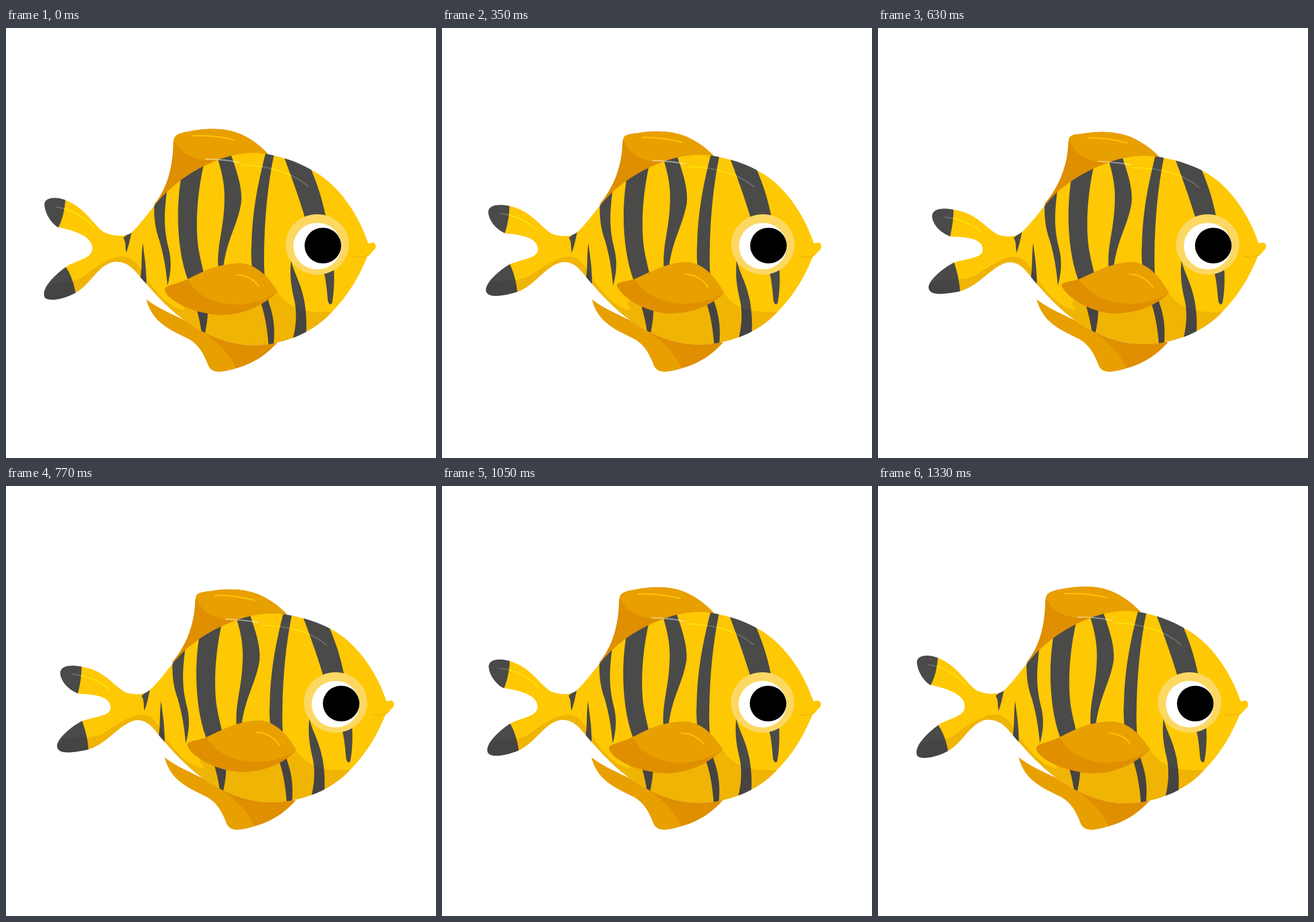
An HTML page that plays this animation: 748x748 px, repeating every 1.4 s.

```html
<!DOCTYPE html>
<html lang="en">
<head>
<meta charset="utf-8">
<title>Swimming fish</title>
<style>
  html, body { margin: 0; width: 100%; height: 100%; overflow: hidden; background: #fff; }
  svg { display: block; width: 100%; height: 100%; }
  .dark { fill: #df8f00; }
  .light { fill: #e89f00; }
  .stripes { fill: #4a4a48; }
  .shade { fill: #f1e6ec; mix-blend-mode: multiply; }
  .line { fill: none; stroke-width: 2.2; stroke-linecap: round; }
  .gold { stroke: #fdc407; }
  .gleam { stroke: #fff; stroke-opacity: .45; }
  .shine { mix-blend-mode: overlay; }
</style>
</head>
<body>
<svg viewBox="0 0 748 748">
  <defs><clipPath id="inside"><use href="#skin"/></clipPath></defs>
  <g id="fish">
    <!-- top fin -->
    <path class="dark" data-peak="560"
      d="M257 308 C282 277 289 240 290 203 C290 189 296 183 320 179 C355 172 386 174 408 184 C430 194 444 206 457 220 L400 250Z"
      data-to="M256 308 C284 275 297 240 299 203 C300 189 304 185 324 184 C355 178 386 181 408 190 C430 200 444 211 457 224 L400 250Z"/>
    <path class="light" data-peak="560"
      d="M291 194 C293 185 302 182 320 179 C355 172 386 174 408 184 C430 194 444 206 457 220 L400 236 L370 228 C332 233 303 222 291 194Z"
      data-to="M300 194 C301 186 308 185 324 184 C355 178 386 181 408 190 C430 200 444 211 457 224 L400 240 L374 233 C338 236 312 223 300 194Z"/>
    <path class="line gold" data-peak="560"
      d="M324 187 C350 186 375 189 397 194" data-to="M334 191 C358 191 380 194 401 200"/>

    <!-- bottom fin -->
    <path class="light" d="M244 472 C270 492 300 502 330 518 L400 535 L472 547 C450 572 425 585 400 592 Q385 597 371 598 C361 598 354 594 351 585 C344 566 334 550 318 541 C290 527 255 515 244 472Z"/>
    <path class="dark" d="M318 512 C355 535 388 560 400 592 C425 585 450 572 472 547 L400 530Z"/>

    <!-- body and tail -->
    <g clip-path="url(#inside)">
      <path id="skin" fill="#fec804" data-peak="630"
        d="M630 374 C614 325 578 270 530 246 C500 229 460 217 428 217 C370 219 310 255 279 286 C255 309 240 335 217 357 C205 364 185 362 170 355 C150 340 133 305 94 296 C78 293 66 297 67 308 C69 325 80 340 90 346 C112 351 150 360 150 383 C150 402 125 402 104 416 C85 430 62 452 67 468 C70 476 95 475 121 461 C147 447 160 412 187 407 C215 404 226 426 243 444 C270 475 295 500 325 518 C365 543 400 552 430 552 C482 552 535 530 567 494 C600 460 615 430 629 397 C636 394 636 389 640 387 C645 382 644 374 638 373 C635 373 633 375 630 374Z"
        data-to="M630 374 C614 325 578 270 530 247 C500 232 460 222 428 222 C370 224 310 258 279 286 C255 309 240 335 217 356 C206 365 186 363 176 359 C152 345 140 322 100 316 C78 312 62 315 62 328 C64 345 80 358 95 363 C117 364 150 364 150 386 C150 400 125 400 100 408 C80 418 55 440 56 452 C58 466 80 464 111 458 C145 448 165 415 193 408 C217 405 227 426 243 444 C270 475 295 500 325 518 C365 542 400 550 430 550 C482 550 535 529 567 494 C600 460 615 430 629 397 C636 394 636 389 640 387 C645 382 644 374 638 373 C635 373 633 375 630 374Z"/>
      <g class="stripes">
        <path data-peak="630" d="M50 280 L104 290 C103 315 98 335 89 350 L50 350Z"
          data-to="M45 300 L99 310 C100 330 97 348 92 368 L45 368Z"/>
        <path data-peak="630" d="M50 412 L101 412 C112 425 119 445 122 466 L50 490Z"
          data-to="M40 404 L99 404 C106 425 110 440 111 465 L40 480Z"/>
        <path d="M204 365 L219 353 C215 370 214 378 209 391 C207 380 209 372 204 365Z"/>
        <path d="M238 374 C241 400 245 420 244 450 L234 434 C237 415 235 395 238 374Z"/>
        <path d="M258 295 L281 275 C275 320 274 345 282 380 C289 405 287 425 281 448 C278 415 274 395 267 370 C258 345 257 325 258 295Z"/>
        <path d="M306 253 L346 230 C334 275 328 340 335 385 C340 415 350 440 351 480 C352 505 348 520 346 532 Q342 534 340 528 C336 500 325 465 316 437 C297 385 295 310 306 253Z"/>
        <path d="M366 220 L389 214 C402 250 412 280 409 305 C402 345 385 365 378 416 L369 416 C367 375 379 350 380 300 C381 270 374 245 366 220Z"/>
        <path d="M453 212 L468 212 C457 262 450 320 449 390 C448 430 452 460 458 480 C467 505 468 530 465 556 L457 556 C455 525 450 495 442 475 C430 440 425 410 427 380 C428 320 438 270 453 212Z"/>
        <path d="M481 218 L527 238 C545 277 555 315 560 350 L570 415 C572 440 570 465 567 479 Q563 484 560 475 C558 455 557 440 553 425 L523 340 C514 308 498 262 481 218Z"/>
        <path d="M496 404 C500 425 512 440 519 475 C523 500 523 515 522 533 L499 541 C505 518 506 495 502 475 C496 450 493 430 496 404Z"/>
      </g>
      <path class="shade" data-peak="630"
        d="M50 462 C80 430 112 455 142 426 C168 407 190 395 208 398 C230 402 240 430 255 450 C270 470 285 482 302 489 C312 493 313 489 308 484 C300 474 320 460 350 450 L470 455 C485 480 505 497 567 494 L600 500 L560 570 L300 570 L220 470 L60 490Z"
        data-to="M40 452 C75 428 112 446 142 428 C168 410 190 396 209 398 C230 402 240 430 255 450 C270 470 285 482 302 489 C312 493 313 489 308 484 C300 474 320 460 350 450 L470 455 C485 480 505 497 567 494 L600 500 L560 570 L300 570 L220 470 L50 485Z"/>
    </g>
    <path class="line gleam shine" data-peak="630"
      d="M87 311 C113 314 138 329 153 347" data-to="M84 329 C108 331 130 341 147 354"/>
    <path class="line gleam" data-peak="630"
      d="M347 228 C367 228 386 229 405 234" data-to="M351 232 C371 233 389 234 407 238"/>
    <path class="line gleam shine" data-peak="630"
      d="M411 238 C455 239 500 252 526 276" data-to="M413 243 C457 243 500 254 526 277"/>
    <path class="line" stroke="#e9a900" style="stroke-width:1" d="M604 397 Q617 401 631 395"/>

    <!-- eye -->
    <ellipse cx="541.5" cy="376.5" rx="55" ry="52.5" fill="#fcd863"/>
    <ellipse cx="541.5" cy="379.5" rx="41.5" ry="40.5" fill="#fff"/>
    <ellipse cx="551.2" cy="378.5" rx="31.8" ry="31"/>

    <!-- side fin -->
    <path class="dark" data-peak="490"
      d="M273 458 C272 449 293 448 315 437 C350 418 375 410 408 410 C440 412 460 440 472 458 C440 490 400 501 370 500 C320 497 277 476 273 458Z"
      data-to="M289 447 C289 440 305 441 325 435 C355 420 380 407 412 407 C442 410 463 440 474 461 C445 490 405 497 375 496 C335 493 295 465 289 447Z"/>
    <path class="light" data-peak="490"
      d="M315 437 C350 418 375 410 408 410 C440 412 460 440 472 458 C430 490 345 495 315 437Z"
      data-to="M318 437 C355 420 380 407 412 407 C442 410 463 440 474 461 C430 490 350 487 318 437Z"/>
    <path class="line gold" data-peak="490"
      d="M400 430 C418 430 431 439 438 449" data-to="M406 428 C424 428 439 439 447 451"/>
  </g>
</svg>
<script>
  const LOOP = 1400, STEP = 70, SWAY = 32.7;
  const fish = document.getElementById('fish');
  const numbers = s => s.match(/[\d.]+/g).map(Number);

  const parts = [...document.querySelectorAll('[data-to]')].map(el => {
    const d = el.getAttribute('d');
    return { el, d, to: numbers(el.dataset.to), from: numbers(d), peak: +el.dataset.peak };
  });

  // 0..1 cosine swing, highest at time `peak`
  const swing = (t, peak) => (1 + Math.cos((t - peak) / LOOP * 2 * Math.PI)) / 2;

  function draw(now) {
    const t = Math.floor(now % LOOP / STEP) * STEP;
    fish.setAttribute('transform', `translate(${SWAY * swing(t, 695)})`);
    for (const { el, d, from, to, peak } of parts) {
      const u = swing(t, peak);
      let i = 0;
      el.setAttribute('d', d.replace(/[\d.]+/g, () => {
        const v = from[i] + (to[i] - from[i]) * u;
        i++;
        return v.toFixed(2);
      }));
    }
  }

  let start;
  function tick(now) {
    start ??= now;
    draw(now - start);
    requestAnimationFrame(tick);
  }
  draw(0);
  requestAnimationFrame(tick);
</script>
</body>
</html>
```
